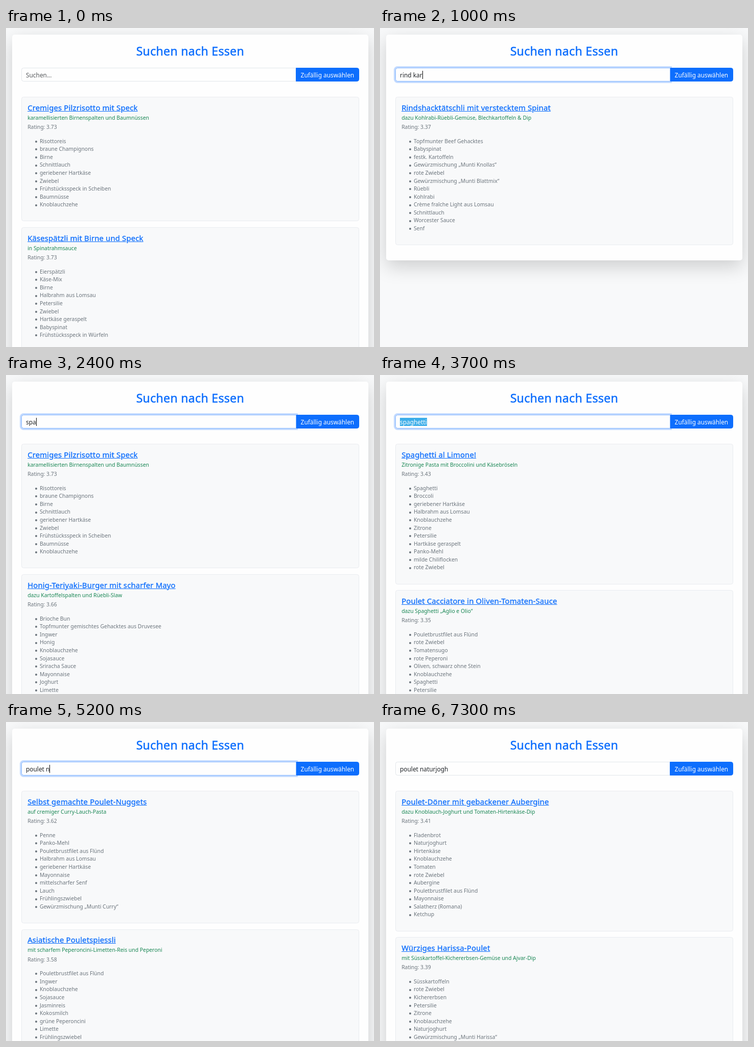
An HTML page for the animation above (7.6 s loop, 720x626 px).

```html
<!DOCTYPE html>
<html lang="de">
<head>
<meta charset="utf-8">
<title>Suchen nach Essen</title>
<style>
  * { box-sizing: border-box; margin: 0; padding: 0; }
  html { font-size: 11.88px; }
  html, body { width: 100%; height: 100%; overflow: hidden; }
  body {
    position: relative;
    background: #f8f9fa;
    font-family: "Noto Sans", "Open Sans", sans-serif;
    line-height: 1.5;
  }
  .panel {
    position: absolute; left: 11.7px; top: 13.4px; width: 697.3px;
    padding: 121.9px 1.5rem 1.5rem;
    background: #fefefe;
    border-radius: .4rem;
    box-shadow: 0 1rem 3rem rgba(0, 0, 0, .175);
  }
  h1, h2 {
    font-weight: 500; line-height: 1.2; letter-spacing: .011em;
    color: #0d6efd; -webkit-text-stroke: .022em;
  }
  h1 {
    position: absolute; left: 0; right: 0; top: 18.3px;
    font-size: 1.95rem; text-align: center;
  }
  .bar { position: absolute; left: 1.5rem; top: 64.2px; width: 661.6px; height: 27.6px; }
  .field, .pick { position: absolute; top: 0; height: 100%; line-height: 26px; white-space: pre; }
  .field {
    left: 0; width: 538.4px; padding-left: 8.5px;
    background: #fefefe; border: 1px solid;
    border-radius: .375rem 0 0 .375rem; color: #212529;
  }
  .pick {
    right: 0; width: 124.4px; text-align: center;
    background: #0d6efd; border: 1px solid #0d6efd; color: #fefefe;
    border-radius: 0 .375rem .375rem 0;
  }
  .hint { color: #585b5e; }
  .marked { background: #3daee9; color: #fefefe; }
  .caret { position: absolute; top: 5px; width: 1px; height: 16px; background: #000; }
  .card {
    margin-bottom: 1rem; padding: calc(1rem - .25px);
    border: 1px solid #e9ecf0; border-radius: .375rem;
    background: #f8f9fa; font-size: .875rem; color: #6c757d;
  }
  .card + .card { min-height: 320px; }
  h2 { margin-bottom: .25rem; font-size: 1.25rem; text-decoration: underline; }
  .sub { margin-bottom: .25rem; color: #198754; }
  ul { margin: 1rem 0; padding-left: 2rem; list-style: none; }
  li { position: relative; }
  li::before {
    content: ""; position: absolute; left: -9px; top: 6.2px;
    width: 4px; height: 4px; border-radius: 50%; background: #6c757d;
  }
</style>
</head>
<body>
<div class="panel">
  <h1>Suchen nach Essen</h1>
  <div class="bar">
    <div class="field" id="field"><span id="text"></span><i class="caret" id="caret"></i></div>
    <div class="pick">Zufällig auswählen</div>
  </div>
  <div id="list"></div>
</div>
<script>
const LOOP = 7600, FOCUS = 270, BLUR = 7140, FADE = 150, BLINK = 550;

// title | subtitle | rating | ingredients
const DISHES = {
  risotto: "Cremiges Pilzrisotto mit Speck|karamellisierten Birnenspalten und Baumnüssen|3.73|Risottoreis;braune Champignons;Birne;Schnittlauch;geriebener Hartkäse;Zwiebel;Frühstücksspeck in Scheiben;Baumnüsse;Knoblauchzehe",
  spaetzli: "Käsespätzli mit Birne und Speck|in Spinatrahmsauce|3.73|Eierspätzli;Käse-Mix;Birne;Halbrahm aus Lomsau;Petersilie;Zwiebel;Hartkäse geraspelt;Babyspinat;Frühstücksspeck in Würfeln",
  rind: "Rindshacktätschli mit verstecktem Spinat|dazu Kohlrabi-Rüebli-Gemüse, Blechkartoffeln & Dip|3.37|Topfmunter Beef Gehacktes;Babyspinat;festk. Kartoffeln;Gewürzmischung „Munti Knollas“;rote Zwiebel;Gewürzmischung „Munti Blattmix“;Rüebli;Kohlrabi;Crème fraîche Light aus Lomsau;Schnittlauch;Worcester Sauce;Senf",
  burger: "Honig-Teriyaki-Burger mit scharfer Mayo|dazu Kartoffelspalten und Rüebli-Slaw|3.66|Brioche Bun;Topfmunter gemischtes Gehacktes aus Druvesee;Ingwer;Honig;Knoblauchzehe;Sojasauce;Sriracha Sauce;Mayonnaise;Joghurt;Limette",
  limone: "Spaghetti al Limone!|Zitronige Pasta mit Broccolini und Käsebröseln|3.43|Spaghetti;Broccoli;geriebener Hartkäse;Halbrahm aus Lomsau;Knoblauchzehe;Zitrone;Petersilie;Hartkäse geraspelt;Panko-Mehl;milde Chiliflocken;rote Zwiebel",
  cacciatore: "Poulet Cacciatore in Oliven-Tomaten-Sauce|dazu Spaghetti „Aglio e Olio“|3.35|Pouletbrustfilet aus Flünd;rote Zwiebel;Tomatensugo;rote Peperoni;Oliven, schwarz ohne Stein;Knoblauchzehe;Spaghetti;Petersilie",
  nuggets: "Selbst gemachte Poulet-Nuggets|auf cremiger Curry-Lauch-Pasta|3.62|Penne;Panko-Mehl;Pouletbrustfilet aus Flünd;Halbrahm aus Lomsau;geriebener Hartkäse;Mayonnaise;mittelscharfer Senf;Lauch;Frühlingszwiebel;Gewürzmischung „Munti Curry“",
  spiessli: "Asiatische Pouletspiessli|mit scharfem Peperoncini-Limetten-Reis und Peperoni|3.58|Pouletbrustfilet aus Flünd;Ingwer;Knoblauchzehe;Sojasauce;Jasminreis;Kokosmilch;grüne Peperoncini;Limette;Frühlingszwiebel",
  doener: "Poulet-Döner mit gebackener Aubergine|dazu Knoblauch-Joghurt und Tomaten-Hirtenkäse-Dip|3.41|Fladenbrot;Naturjoghurt;Hirtenkäse;Knoblauchzehe;Tomaten;rote Zwiebel;Aubergine;Pouletbrustfilet aus Flünd;Mayonnaise;Salatherz (Romana);Ketchup",
  harissa: "Würziges Harissa-Poulet|mit Süsskartoffel-Kichererbsen-Gemüse und Ajvar-Dip|3.39|Süsskartoffeln;rote Zwiebel;Kichererbsen;Petersilie;Zitrone;Knoblauchzehe;Naturjoghurt;Gewürzmischung „Munti Harissa“"
};

const ALL = "risotto spaetzli", PASTA = "limone cacciatore",
      POULET = "nuggets spiessli", YOGHURT = "doener harissa";

// time, query, dishes, selected
const STEPS = [
  [0, "", ALL],
  [600, "r", ALL],
  [700, "ri", "risotto burger"],
  [800, "rind", "rind"],
  [900, "rind k", "rind"],
  [1000, "rind kar", "rind"],
  [1100, "rind kart", "rind"],
  [1400, "rind kartoffel", "rind"],
  [1800, "rind kartoffel", "rind", true],
  [2100, "s", ALL],
  [2200, "sp", ALL],
  [2400, "spa", "risotto burger"],
  [2500, "spag", PASTA],
  [2600, "spagh", PASTA],
  [2700, "spaghet", PASTA],
  [2800, "spaghetti", PASTA],
  [3600, "spaghetti", PASTA, true],
  [3900, "p", ALL],
  [4100, "po", POULET],
  [4200, "pou", POULET],
  [4300, "poul", POULET],
  [4400, "poulet", POULET],
  [4600, "poulet ", POULET],
  [5200, "poulet n", POULET],
  [5300, "poulet na", POULET],
  [5400, "poulet nat", YOGHURT],
  [5500, "poulet natur", YOGHURT],
  [5600, "poulet naturj", YOGHURT],
  [6000, "poulet naturjogh", YOGHURT]
];

const [field, text, caret, list] =
  ["field", "text", "caret", "list"].map(id => document.getElementById(id));

function add(parent, tag, content = "", cls = "") {
  const el = parent.appendChild(document.createElement(tag));
  el.textContent = content;
  el.className = cls;
  return el;
}

function addCard(key) {
  const [title, sub, rating, items] = DISHES[key].split("|");
  const card = add(list, "div", "", "card");
  add(card, "h2", title);
  add(card, "p", sub, "sub");
  add(card, "p", "Rating: " + rating);
  const ul = add(card, "ul");
  items.split(";").forEach(item => add(ul, "li", item));
}

let shownStep, shownDishes;

function showStep(step) {
  if (step === shownStep) return;
  shownStep = step;
  const [, query, dishes, selected] = step;
  text.textContent = query || "Suchen...";
  text.className = selected ? "marked" : query ? "" : "hint";
  caret.style.left = 8.5 + (query && text.getBoundingClientRect().width) + "px";
  if (dishes !== shownDishes) {
    shownDishes = dishes;
    list.textContent = "";
    dishes.split(" ").forEach(addCard);
  }
}

function ease(t, start) {
  const p = Math.min(1, Math.max(0, (t - start) / FADE));
  return p * p * (3 - 2 * p);
}

function showFocus(t) {
  const f = ease(t, FOCUS) - ease(t, BLUR);
  const mix = (a, b) => Math.round(a + (b - a) * f);
  field.style.borderColor = `rgb(${mix(226, 134)},${mix(230, 183)},${mix(234, 254)})`;
  field.style.boxShadow = `0 0 0 ${3 * f}px rgba(13,110,253,${.25 * f})`;
  field.style.zIndex = t >= FOCUS && t < BLUR ? 1 : 0;
}

function draw() {
  const t = performance.now() % LOOP;
  const step = STEPS.filter(s => s[0] <= t).pop();
  showStep(step);
  showFocus(t);
  const since = t - Math.max(step[0], FOCUS);
  const on = t >= FOCUS && t < BLUR && !step[3] && since % (2 * BLINK) < BLINK;
  caret.style.visibility = on ? "visible" : "hidden";
  requestAnimationFrame(draw);
}
draw();
</script>
</body>
</html>
```
